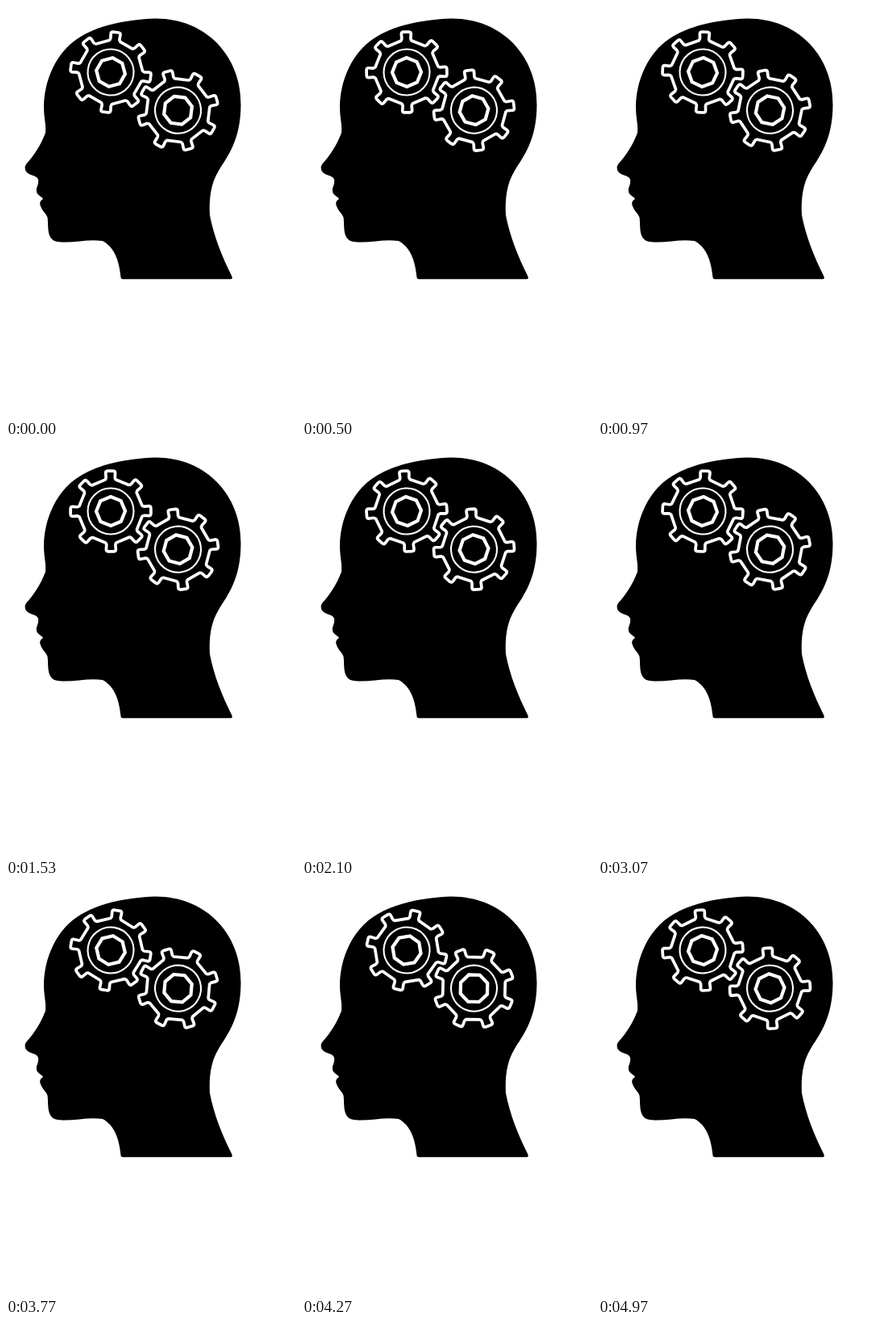
Write an HTML page that moves like this. It is 360 by 509 pixels and loops after 5.07 s.

```html
<!DOCTYPE html>
<html lang="en">
<head>
<meta charset="utf-8">
<title>Thinking head</title>
<style>
  html, body { margin: 0; width: 100%; height: 100%; overflow: hidden; background: #fff; }
  svg { display: block; }
  .gear { fill: none; stroke: #fff; stroke-linejoin: round; }
</style>
</head>
<body>
<svg width="360" height="509" viewBox="0 0 360 509">
  <path d="M142.500 336 Q142.500 338.300 145 338.300 L279 338.300 Q281.500 338.300 280.500 335
    C268 310 258 285 253 259 C252 239 254 220 264 204
    C275 186 291.500 166 291.500 122 C292 62 248 15 185 15.500
    C148 17 113 24 88 41 C64 57 47 90 47 126 C47 138 50 147 49 157
    C43 173 34 186 25 196 Q22 200 25 205 C30 211 38 209 40 215
    C41 222 37 224 38 230 C39 235 45 236 46 239 C43 241 41 243 43 248
    C45 254 50 257 51.500 262 C53 272 50 288 62 291.500
    C78 295 101 288 120 291 C135 299 140.500 316 142.500 336 Z"/>
  <defs>
    <g id="gear" class="gear">
      <path id="teeth" stroke-width="3.7"/>
      <circle r="28.500" stroke-width="2.100"/>
      <path id="hub" stroke-width="4.200" stroke-linejoin="miter"/>
    </g>
  </defs>
  <use id="left" href="#gear"/>
  <use id="right" href="#gear"/>
</svg>
<script>
const $ = id => document.getElementById(id);
const TEETH = 8, PITCH = 360 / TEETH;
const LOOP = 5070, STEPS = 63;
const SWEEP = 23, START = 18.4, PERIOD = 3.265; // degrees, degrees, steps

const polar = (r, deg) => {
  const a = deg * Math.PI / 180;
  return (r * Math.sin(a)).toFixed(2) + ' ' + (-r * Math.cos(a)).toFixed(2);
};

let teeth = '', hub = '';
for (let i = 0; i < TEETH; i++) {
  const p = (r, d) => polar(r, i * PITCH + d);
  teeth += `${i ? 'L' : 'M'} ${p(39.5, -10)}
    Q${p(40.5, -8)} ${p(42, -7.6)} L${p(47.5, -7.2)} Q${p(50, -7)} ${p(50, -4)}
    L${p(50, 4)} Q${p(50, 7)} ${p(47.5, 7.2)} L${p(42, 7.6)} Q${p(40.5, 8)} ${p(39.5, 10)}`;
  hub += (i ? 'L' : 'M') + p(18, 0);
}
$('teeth').setAttribute('d', teeth + 'Z');
$('hub').setAttribute('d', hub + 'Z');

const place = (id, x, y, deg) =>
  $(id).setAttribute('transform', `translate(${x} ${y}) rotate(${deg})`);

// 80 ms steps on a 30 fps clock; the gears sweep back, then snap to the start.
function draw() {
  const tick = Math.floor((performance.now() % LOOP + 4) * 0.03);
  const step = Math.min(STEPS - 1, Math.floor(tick / 2.4 + 1e-6));
  // The loop opens on the pose that follows its last step.
  const angle = START - SWEEP * ((step || STEPS + 0.6) / PERIOD % 1);
  place('left', 130, 82, angle);
  place('right', 213.5, 129.2, -8 - angle);
  requestAnimationFrame(draw);
}
draw();
</script>
</body>
</html>
```
